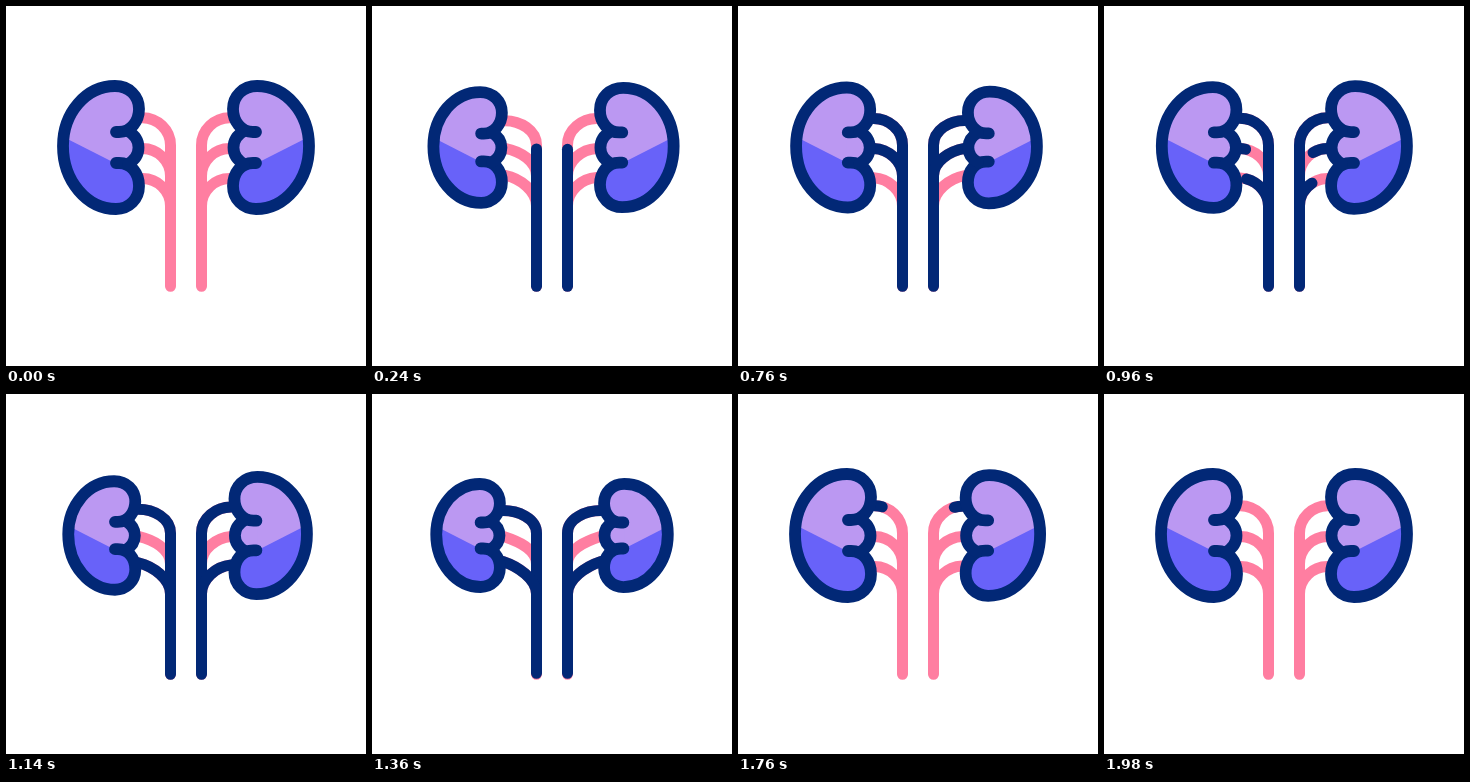
An HTML page with a canvas that plays this animation: 360 by 360 pixels, repeating every 2.4 s.

```html
<!DOCTYPE html>
<html lang="en">
<head>
<meta charset="utf-8">
<title>Kidneys</title>
<style>
html, body { margin: 0; width: 100%; height: 100%; overflow: hidden; background: #fff; }
canvas { display: block; width: 360px; height: 360px; }
</style>
</head>
<body>
<canvas id="stage"></canvas>
<script>
const SIZE = 360, LOOP = 2400;
const NAVY = '#022876', PINK = '#ff7ea1', LILAC = '#bb98f2', BLUE = '#6862f9';
const BEAT = 868, DELAY = 120, SHRINK = 0.17;
const CX = 101.5, CY = 141.5;
const TRUNK = 164.5, FOOT = 280.3, R = 27.5, K = 0.55;

const canvas = document.getElementById('stage');
const ctx = canvas.getContext('2d');
const dpr = window.devicePixelRatio || 1;
canvas.width = canvas.height = SIZE * dpr;

const lobes = new Path2D(
  'M110 126H113C125 126 133 115 133 103C133 90 123 80 109 80' +
  'C80 80 57 107 57 140C57 175 81 203 110 203' +
  'C123 203 133 193 133 180C133 167 125 157 113 157H110');
const bulge = 'C129 129 132.5 135 132.5 141.5C132.5 148 129 154 122 158';
const hilum = new Path2D('M122 125' + bulge);
const hilumFill = new Path2D('M109 126L122 125' + bulge + 'L109 157Z');
const lower = new Path2D('M40 122L150 178V230H40Z');

// Branch height, slope gained while squeezed, growing and fading times
const veins = [
  { y: 111.7, tilt: 0, trunk: true, grow: [0, 360], fade: [1340, 480], lag: 0 },
  { y: 142.5, tilt: 30, grow: [424, 200], fade: [806, 200], lag: 34 },
  { y: 172.5, tilt: 30, grow: [810, 200], fade: [1350, 200], lag: 34 }
];

function ease(t, [start, span]) {
  const p = Math.min(1, Math.max(0, (t - start) / span));
  return p * p * (3 - 2 * p);
}

function beat(t) {
  if (t <= 0 || t >= 2 * BEAT) return 1;
  return 1 - SHRINK * (1 - Math.cos(2 * Math.PI * t / BEAT)) / 2;
}

// The kidney end of each branch follows the beating
function veinShape(v, s) {
  const x = CX + (136.5 - CX) * s, y = CY + (v.y - CY) * s;
  const base = v.y + R;
  const xs = [TRUNK, TRUNK, x + R * K, x];
  const ys = [base, base - R * K, y + v.tilt * (1 - s), y];
  const path = new Path2D();
  if (v.trunk) {
    path.moveTo(TRUNK, FOOT);
    path.lineTo(TRUNK, base);
  } else {
    path.moveTo(TRUNK, base);
  }
  path.bezierCurveTo(xs[1], ys[1], xs[2], ys[2], xs[3], ys[3]);

  const at = (c, u) => {
    const w = 1 - u;
    return w * w * w * c[0] + 3 * w * w * u * c[1] + 3 * w * u * u * c[2] + u * u * u * c[3];
  };
  let length = v.trunk ? FOOT - base : 0;
  for (let i = 0; i < 24; i++) {
    const a = i / 24, b = (i + 1) / 24;
    length += Math.hypot(at(xs, b) - at(xs, a), at(ys, b) - at(ys, a));
  }
  return { path, length };
}

function drawVeins(t, s, right) {
  const shapes = veins.map(v => veinShape(v, s));
  ctx.lineWidth = 11;
  ctx.strokeStyle = PINK;
  for (const shape of shapes) ctx.stroke(shape.path);

  ctx.strokeStyle = NAVY;
  veins.forEach((v, i) => {
    const local = t - (right ? v.lag : 0);
    const head = ease(local, v.grow), tail = ease(local, v.fade);
    if (head - tail < 0.001) return;
    const { path, length } = shapes[i];
    ctx.setLineDash([(head - tail) * length + 0.1, length * 2]);
    ctx.lineDashOffset = -tail * length;
    ctx.stroke(path);
  });
  ctx.setLineDash([]);
}

function drawKidney(s) {
  // Only the outline's path shrinks, its line weight stays
  const scaled = path => {
    const out = new Path2D();
    out.addPath(path, new DOMMatrix([s, 0, 0, s, CX * (1 - s), CY * (1 - s)]));
    return out;
  };
  const body = scaled(lobes);
  ctx.fillStyle = LILAC;
  ctx.fill(body);
  ctx.fill(scaled(hilumFill));
  ctx.save();
  ctx.clip(body);
  ctx.fillStyle = BLUE;
  ctx.fill(scaled(lower));
  ctx.restore();
  ctx.lineWidth = 11.8;
  ctx.strokeStyle = NAVY;
  ctx.stroke(body);
  ctx.stroke(scaled(hilum));
}

function drawSide(t, right) {
  const s = beat(right ? t - DELAY : t);
  ctx.save();
  if (right) {
    ctx.translate(SIZE, 0);
    ctx.scale(-1, 1);
  }
  drawVeins(t, s, right);
  drawKidney(s);
  ctx.restore();
}

function draw(t) {
  ctx.setTransform(dpr, 0, 0, dpr, 0, 0);
  ctx.fillStyle = '#fff';
  ctx.fillRect(0, 0, SIZE, SIZE);
  ctx.lineCap = ctx.lineJoin = 'round';
  drawSide(t, false);
  drawSide(t, true);
}

let begin;
function tick(now) {
  if (begin === undefined) begin = now;
  draw((now - begin) % LOOP);
  requestAnimationFrame(tick);
}
draw(0);
requestAnimationFrame(tick);
</script>
</body>
</html>
```
